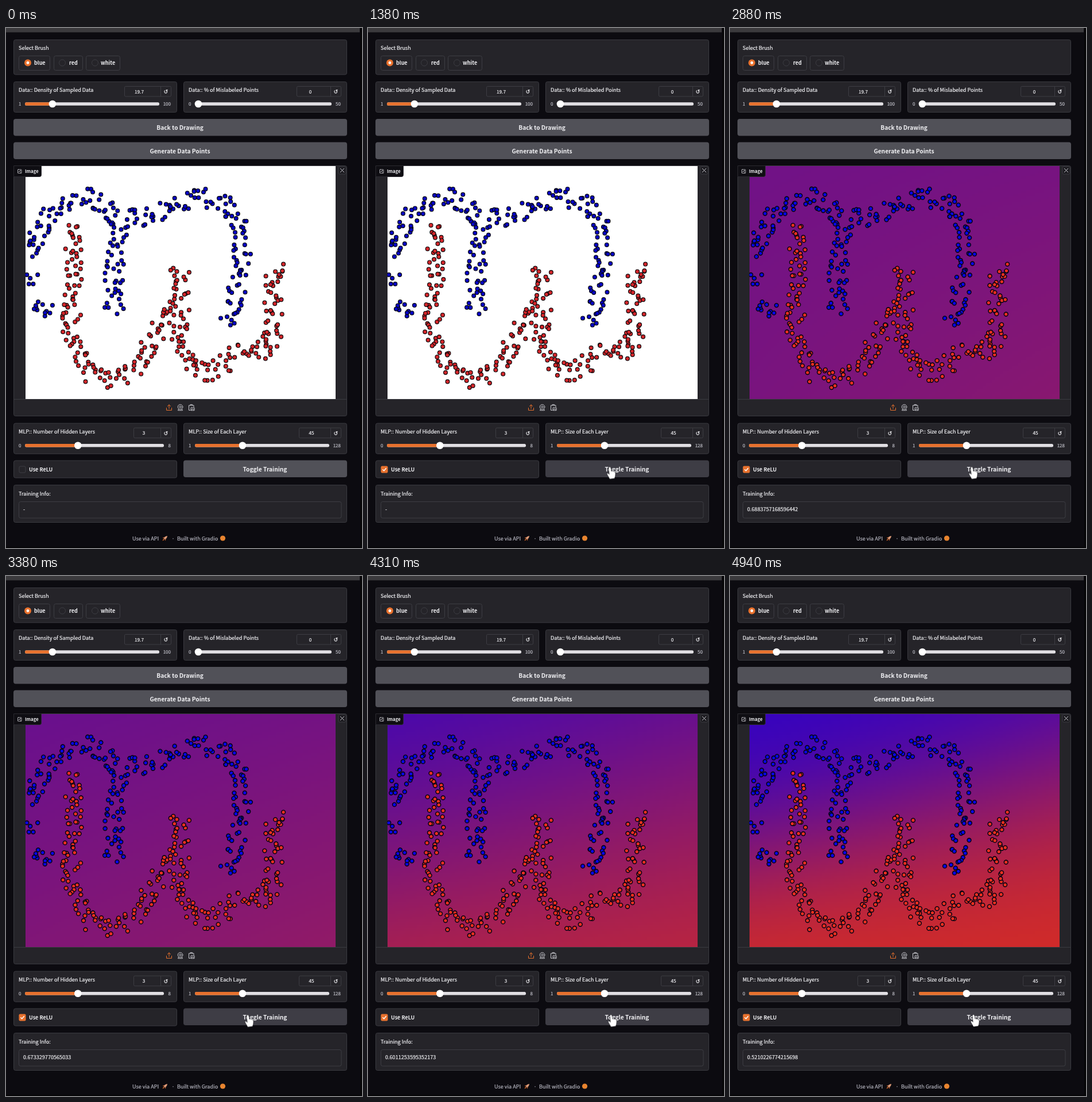
Animation of 620x904 px, one loop 5000 ms. Source, as an HTML page with a canvas:

```html
<!DOCTYPE html>
<html lang="en">
<head>
<meta charset="utf-8">
<title>MLP playground</title>
<style>
  html, body { margin: 0; width: 100%; height: 100%; overflow: hidden; background: #0c0b10; }
  svg, canvas { position: absolute; left: 0; top: 0; }
  #heat { left: 33.5px; top: 240px; width: 540px; height: 405px; }
  text {
    font: 400 9.1px "Noto Sans CJK JP", "Noto Sans CJK SC", "Noto Sans CJK", "Noto Sans", sans-serif;
    color: #f1f1f4; fill: currentColor; stroke: currentColor; stroke-width: .22; white-space: pre;
  }
  .bold { font-weight: 600; font-size: 9px; stroke: none; }
  .btn-text { font-weight: 600; font-size: 10.2px; text-anchor: middle; stroke: none; }
  .num { font-size: 8.2px; text-anchor: middle; }
  .lim { font-size: 8px; color: #bcbcc4; }
  .end { text-anchor: end; }
  .reset { font: 9.5px "DejaVu Sans", sans-serif; text-anchor: middle; }
  .foot { color: #b2b2bc; }
  .panel { fill: #252429; stroke: #3a3a40; }
  .field { fill: #252429; stroke: #3d3d43; }
  .btn { fill: #515158; }
  .line { fill: none; stroke: #c9c9cf; stroke-linecap: round; stroke-linejoin: round; }
  .orange { fill: #e8712d; }
  .track { fill: #e1dfe3; }
  .knob { fill: #fff; }

  .dots circle { stroke: #08080c; stroke-width: 1.2; }
  .blue { fill: #0604c4; }
  .red { fill: #d3262a; }
  .trained circle { stroke: #0a0414; stroke-width: 1.6; }
  .trained .blue { fill: #0606ea; }
  .trained .red { fill: #f2301f; }

  #toggle { animation: hover 5s step-end infinite; }
  #check { animation: check 5s step-end infinite; }
  #hand { animation: move 5s ease-in-out infinite, show 5s step-end infinite; }
  @keyframes hover { 0% { fill: #515158; } 24.8%, 100% { fill: #3e3d45; } }
  @keyframes check { 0% { opacity: 0; } 15%, 100% { opacity: 1; } }
  @keyframes show { 0% { opacity: 0; } 3.7%, 100% { opacity: 1; } }
  @keyframes move {
    0%, 3.7% { transform: translate(70px, 806px); }
    10%, 18% { transform: translate(28px, 768px); }
    26.5%, 80% { transform: translate(421px, 763.5px); }
    90%, 100% { transform: translate(424px, 763px); }
  }
</style>
</head>
<body>
<svg width="620" height="904" viewBox="0 0 620 904">
  <rect width="616" height="7.5" fill="#3b3a3d"/>
  <rect x="617" width="3" height="904" fill="#050507"/>
  <rect y="902" width="620" height="2" fill="#050507"/>

  <rect class="panel" x="13.5" y="20.5" width="580" height="60.5" rx="3"/>
  <text x="22" y="38">Select Brush</text>
  <rect class="field" x="22.5" y="48.5" width="54" height="25" rx="3"/>
  <rect class="field" x="83.5" y="48.5" width="50" height="25" rx="3"/>
  <rect class="field" x="139.5" y="48.5" width="59" height="25" rx="3"/>
  <circle class="orange" cx="38" cy="60.5" r="6"/>
  <circle class="knob" cx="38" cy="60.5" r="2.4"/>
  <circle class="field" cx="98" cy="60.5" r="5.5"/>
  <circle class="field" cx="155" cy="60.5" r="5.5"/>
  <text class="bold" x="49" y="64">blue</text>
  <text class="bold" x="110" y="64">red</text>
  <text class="bold" x="165" y="64">white</text>

  <g id="sliders"></g>

  <rect class="btn" x="13" y="158" width="581" height="29.5" rx="4"/>
  <text class="btn-text" x="303" y="177">Back to Drawing</text>
  <rect class="btn" x="13" y="198.5" width="581" height="29.5" rx="4"/>
  <text class="btn-text" x="303" y="217.5">Generate Data Points</text>

  <rect class="panel" x="13.5" y="239.5" width="580" height="435" rx="3"/>
  <path d="M14 645.5H593" stroke="#3a3a40"/>
  <rect x="579" y="241" width="13" height="13" rx="2" fill="#1d1c21" stroke="#3a3a40"/>
  <path class="line" d="M582.3 244.3l6.4 6.4M588.7 244.3l-6.4 6.4"/>
  <path class="line" style="stroke:#e8712d" d="M284 661.5V655M281.3 657.6L284 655L286.7 657.6M279.5 660.5V664.5H288.5V660.5"/>
  <g class="line">
    <circle cx="303.5" cy="658.8" r="4.3"/>
    <circle cx="303.5" cy="658.8" r="1.8"/>
    <path d="M300.5 662.5L299.5 664.8H307.5L306.5 662.5"/>
    <path d="M321 664.5H318.5V656H327V658.5M321 656V654.7H324.6V656"/>
    <rect x="322.5" y="660" width="5.5" height="4.8"/>
    <path d="M323 664L325 662L327.5 664"/>
  </g>

  <rect class="panel" x="13.5" y="752" width="284" height="30" rx="3"/>
  <rect class="field" x="23" y="762" width="11" height="11" rx="2"/>
  <g id="check">
    <rect class="orange" x="22.5" y="761.5" width="12" height="12" rx="2"/>
    <path class="line" style="stroke:#fff;stroke-width:1.5" d="M25.8 767.8L27.8 769.7L31.4 765.6"/>
  </g>
  <text class="bold" x="40" y="770.7">Use ReLU</text>
  <rect id="toggle" x="309" y="751.5" width="285" height="29.5" rx="4"/>
  <text class="btn-text" x="451" y="770.5">Toggle Training</text>

  <rect class="panel" x="13.5" y="794.5" width="580" height="65" rx="3"/>
  <text x="22" y="812.5">Training Info:</text>
  <rect class="field" x="22.5" y="823.5" width="561.5" height="28.5" rx="3"/>
  <text id="loss" x="30" y="839.5">-</text>

  <text class="foot" x="220" y="890.5">Use via API</text>
  <path d="M281 883Q276.5 883.5 274.5 887L276.8 889.3Q280.5 887.5 281 883Z" fill="#dd9a78"/>
  <path class="orange" d="M275.5 885.3L272.7 886.3L274.2 887.3ZM278.7 888.5L277.7 891.3L276.6 889.7ZM274.3 888L272.3 891.5L276 889.7Z"/>
  <text class="foot" x="288.5" y="890.5">·</text>
  <text class="foot" x="298" y="890.5">Built with Gradio</text>
  <circle cx="377.5" cy="887" r="4.6" fill="#e8842f"/>
</svg>

<canvas id="heat" width="108" height="81"></canvas>

<svg width="620" height="904" viewBox="0 0 620 904">
  <clipPath id="frame"><rect x="33.5" y="240" width="540" height="405"/></clipPath>
  <g id="dots" class="dots" clip-path="url(#frame)"></g>
  <path d="M13.5 239.5H61.5V255.5Q61.5 258.5 58.5 258.5H13.5Z" fill="#0f0e13" stroke="#2b2a30"/>
  <g class="line" style="stroke-width:.8">
    <rect x="20.5" y="246" width="6.5" height="6.5" rx=".8"/>
    <path d="M21 251L23 249L26.5 252"/>
    <circle cx="24.8" cy="248" r=".5"/>
  </g>
  <text class="bold" style="font-size:7.8px" x="33" y="252">Image</text>
  <path id="hand" fill="#fff" stroke="#18181c" stroke-width=".5"
    d="M-1.8 1.2Q-1.5-.5 0-.5Q1.6-.5 1.8 1.2L2.6 7Q4.5 5.8 5.6 7.4Q7.4 6.4 8.3 8.2Q10 7.8 10 10L9.8 14Q9.5 17 8.2 19.5L0 20.5Q-1.5 17.5-4 13.5Q-5.4 11-3.8 10.6Q-2.4 10.6-.8 12.6Z"/>
</svg>

<script>
const $ = id => document.getElementById(id);
const lerp = (a, b, f) => a + (b - a) * f;
const LOOP = 5000, STEP = 62.5, LOSS_AT = 2500, HEAT_AT = 2750, END = 4937.5;

function slider(x, y, label, value, min, max, fieldWidth) {
  const left = x + 20, end = x + 266 - 4 * String(max).length;
  const knob = lerp(left + 6, end - 6, (value - min) / (max - min));
  const right = x + 275, field = right - fieldWidth;
  return `<rect class="panel" x="${x + .5}" y="${y + .5}" width="284" height="53" rx="3"/>
    <text x="${x + 9}" y="${y + 18}">${label}</text>
    <rect class="field" x="${field - .5}" y="${y + 8.5}" width="${fieldWidth}" height="17.5" rx="2"/>
    <path d="M${right - 18.5} ${y + 9}v17" stroke="#3d3d43"/>
    <text class="num" x="${(field + right - 19) / 2 - 6}" y="${y + 20.7}">${value}</text>
    <text class="reset" x="${right - 9.5}" y="${y + 21}">↺</text>
    <text class="lim" x="${x + 9}" y="${y + 42}">${min}</text>
    <rect class="track" x="${left}" y="${y + 36.3}" width="${end - left}" height="5.5" rx="2.5"/>
    <rect class="orange" x="${left}" y="${y + 36.3}" width="${knob - left}" height="5.5" rx="2.5"/>
    <circle class="knob" cx="${knob}" cy="${y + 39}" r="6.3"/>
    <text class="lim end" x="${x + 274}" y="${y + 42}">${max}</text>`;
}
$("sliders").innerHTML =
  slider(13, 93, "Data:: Density of Sampled Data", 19.7, 1, 100, 81) +
  slider(309, 93, "Data:: % of Mislabeled Points", 0, 0, 50, 77) +
  slider(13, 686.7, "MLP:: Number of Hidden Layers", 3, 0, 8, 65) +
  slider(309, 686.7, "MLP:: Size of Each Layer", 45, 1, 128, 73);

// Brush strokes the points are sampled from
const strokes = {
  blue: [
    "M78 494L42 482", "M40 446L40 428",
    "M42 398Q48 335 105 308T175 316T270 318T365 303Q412 310 412 370T386 516",
    "M198 340Q186 400 188 498"
  ],
  red: [
    "M117 342L115 500Q115 605 170 608T240 572T282 500T301 414",
    "M303 488Q296 575 325 592T390 576T445 562T466 490T481 414"
  ]
};
const GAP = 3.7, BRUSH = 17;

let seed = 11;
const rand = () => (seed = seed * 16807 % 2147483647) / 2147483647;

function scatter(name) {
  let out = "";
  for (const d of strokes[name]) {
    const path = document.createElementNS("http://www.w3.org/2000/svg", "path");
    path.setAttribute("d", d);
    const len = path.getTotalLength();
    for (let s = 0; s < len; s += GAP) {
      const at = Math.min(Math.max(s + (rand() - .5) * 16, 1), len - 1);
      const p = path.getPointAtLength(at), q = path.getPointAtLength(at + 1);
      const off = (rand() * 2 - 1) * BRUSH;
      const x = Math.max(p.x - (q.y - p.y) * off, 35 + rand() * 8);
      const y = p.y + (q.x - p.x) * off;
      out += `<circle class="${name}" cx="${x.toFixed(1)}" cy="${y.toFixed(1)}" r="3.4"/>`;
    }
  }
  return out;
}
$("dots").innerHTML = scatter("blue") + scatter("red");

// Training curve: time, loss
const curve = [
  [2687.5, 0.6940179467201233],
  [3375, 0.673329770565033],
  [3937.5, 0.6319573521614075],
  [4625, 0.5641269683837891],
  [END, 0.5210226774215698]
];

function lossAt(t) {
  const next = curve.findIndex(k => k[0] > t);
  if (next === 0) return curve[0][1];
  if (next < 0) return curve.at(-1)[1];
  const [t0, a] = curve[next - 1], [t1, b] = curve[next];
  return lerp(a, b, (t - t0) / (t1 - t0));
}

// Logits at the corners: top left, top right, bottom left, bottom right
const first = [-.45, -.3, -.25, .1], last = [-2.8, -1, 2, 2.8];
const cold = [45, 0, 200], hot = [218, 45, 32];
const heat = $("heat"), ctx = heat.getContext("2d");
const { width: W, height: H } = heat;
const img = ctx.createImageData(W, H);

function paint(t) {
  const grow = Math.min((t - HEAT_AT) / (END - HEAT_AT), 1) ** 2;
  const [a, b, c, d] = first.map((z, i) => lerp(z, last[i], grow));
  for (let y = 0, o = 0; y < H; y++) {
    const v = (y + .5) / H, left = lerp(a, c, v), right = lerp(b, d, v);
    for (let x = 0; x < W; x++, o += 4) {
      const p = 1 / (1 + Math.exp(-lerp(left, right, (x + .5) / W)));
      for (let k = 0; k < 3; k++) img.data[o + k] = lerp(cold[k], hot[k], p);
      img.data[o + 3] = 255;
    }
  }
  ctx.putImageData(img, 0, 0);
}

let shown;
function draw() {
  const t = Math.floor(performance.now() % LOOP / STEP) * STEP;
  if (t !== shown) {
    shown = t;
    const trained = t >= HEAT_AT;
    $("loss").textContent = t >= LOSS_AT ? lossAt(t) : "-";
    $("dots").classList.toggle("trained", trained);
    if (trained) paint(t);
    else {
      ctx.fillStyle = "#fff";
      ctx.fillRect(0, 0, W, H);
    }
  }
  requestAnimationFrame(draw);
}
draw();
</script>
</body>
</html>
```
